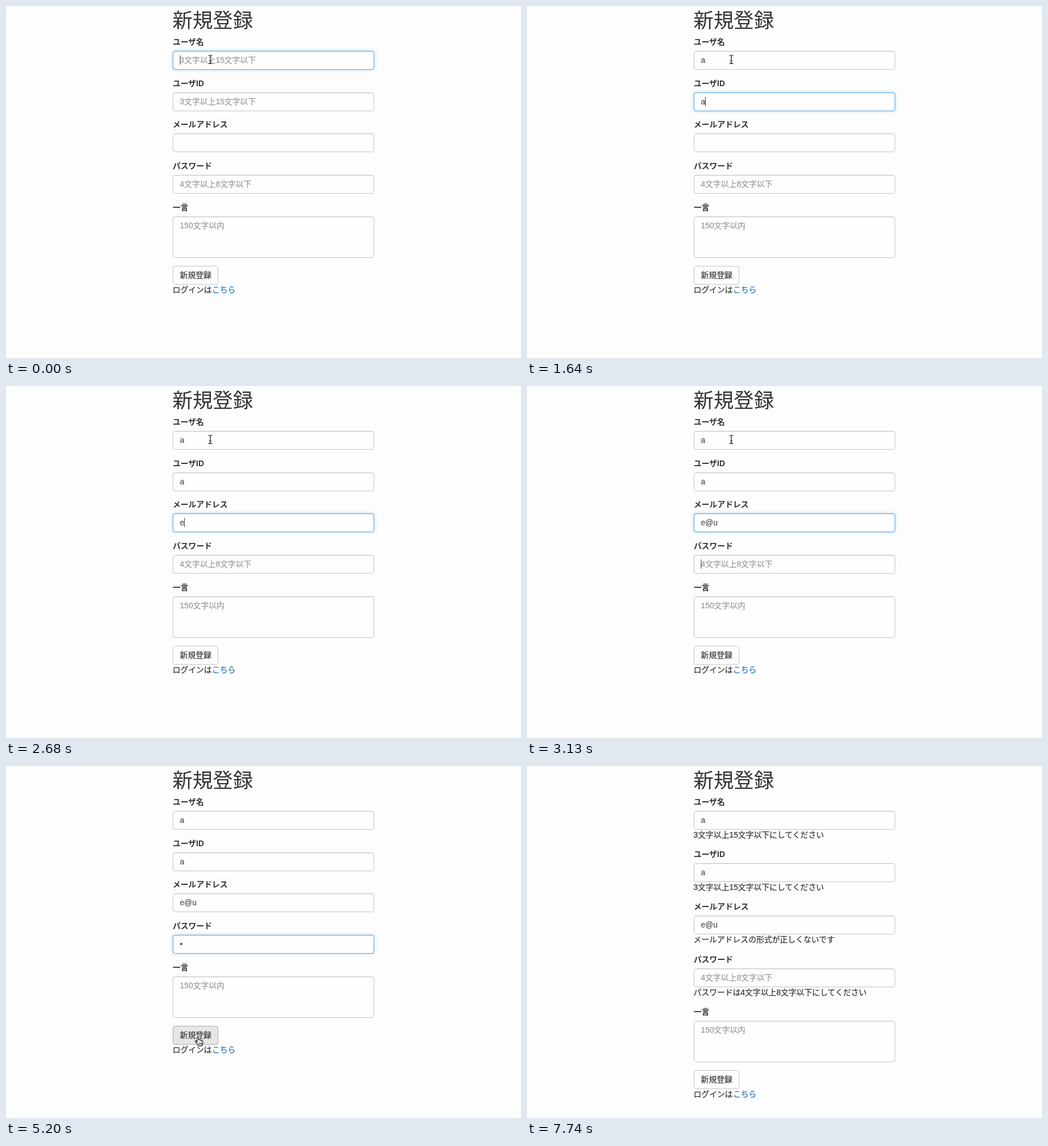
An HTML page that plays this animation: 905x619 px, repeating every 8940 ms.

```html
<!DOCTYPE html>
<html lang="ja">
<head>
<meta charset="utf-8">
<title>新規登録</title>
<style>
  html, body { margin: 0; width: 100%; height: 100%; overflow: hidden; background: #fdfdfd; }
  svg { display: block; }
  text {
    font: 13.8px "Liberation Sans", "Noto Sans CJK JP", "Noto Sans CJK", sans-serif;
    color: #333; fill: currentColor; stroke: currentColor; stroke-width: .22;
  }
  .title { font-size: 35.4px; font-weight: 300; stroke: none; }
  .label { font-weight: 700; stroke: none; }
  .value { color: #505050; }
  .hint { color: #999; }
  .link { color: #2272b8; }
  .box { fill: #fefefe; stroke: #c4c4c4; }
  .inset { stroke: #000; stroke-opacity: .05; }
  .glow { fill: #66afe9; fill-opacity: .6; filter: blur(3px); }
  .ring { fill: none; stroke: #5fabe6; }
  .focus { fill: none; stroke: #5b9fe6; stroke-width: 3; stroke-opacity: .75; }
  .caret { fill: #333; }
  .halo { fill: #fff; stroke: #fff; stroke-width: 2.6; stroke-linejoin: round; }
</style>
</head>
<body>
<svg id="stage" width="905" height="619" viewBox="0 0 905 619"></svg>
<script>
const LOOP = 8940, LEFT = 293, PAD = 305.6;
const svg = document.getElementById('stage');

function add(parent, tag, attrs = {}, content = '') {
  const el = document.createElementNS('http://www.w3.org/2000/svg', tag);
  for (const key in attrs) el.setAttribute(key, attrs[key]);
  el.textContent = content;
  return parent.appendChild(el);
}
const text = (parent, cls, x, y, content) => add(parent, 'text', { class: cls, x, y }, content);
const box = (parent, cls, w, h) =>
  add(parent, 'rect', { class: cls, x: LEFT + .5, y: .5, width: w - 1, height: h - 1, rx: 3.5 });
const fade = (el, level) => el.setAttribute('opacity', +level);
const move = (el, x, y) => el.setAttribute('transform', `translate(${x} ${y})`);

text(svg, 'title', 292.6, 38, '新規登録');

// label, hint, error, height
const fields = [
  ['ユーザ名', '3文字以上15文字以下', '3文字以上15文字以下にしてください', 33],
  ['ユーザID', '3文字以上15文字以下', '3文字以上15文字以下にしてください', 33],
  ['メールアドレス', '', 'メールアドレスの形式が正しくないです', 33],
  ['パスワード', '4文字以上8文字以下', 'パスワードは4文字以上8文字以下にしてください', 33],
  ['一言', '150文字以内', '', 73]
].map(([label, hint, error, h]) => {
  const g = add(svg, 'g');
  const glow = box(g, 'glow', 354, h);
  box(g, 'box', 354, h);
  add(g, 'path', { class: 'inset', d: `M${LEFT + 3} 1.5h348` });
  text(g, 'label', LEFT, -11, label);
  return {
    g, glow,
    ring: box(g, 'ring', 354, h),
    hint: text(g, 'hint', PAD, 21.2, hint),
    value: text(g, 'value', PAD, 21.3, ''),
    error: text(g, '', LEFT - .4, 47.2, error)
  };
});

const foot = add(svg, 'g');
const button = box(foot, 'box', 80, 33);
const outline = add(foot, 'rect', { class: 'focus', x: 291.5, y: -1.5, width: 83, height: 36, rx: 5 });
text(foot, '', PAD, 21.4, '新規登録');
text(foot, '', LEFT - .3, 47.2, 'ログインは');
text(foot, 'link', LEFT + 69, 47.2, 'こちら');

const caret = add(svg, 'rect', { class: 'caret', width: 1, height: 16 });

const beamPath = 'M-3.5-7.5Q0-7.5 0-5.5V5.5Q0 7.5-3.5 7.5M3.5-7.5Q0-7.5 0-5.5M0 5.5Q0 7.5 3.5 7.5M-2 2.5H2';
const handPath = 'M4 10V2Q4 .7 5.2.7T6.4 2V6.5Q6.6 5.6 7.7 5.7T8.8 6.9Q9 6.2 10 6.3T11 7.4' +
  'Q11.3 6.9 12.1 7.1T13.2 8.5V11.5Q13 13 12 14V15.5H5.5V14.2Q4 12.5 2.8 10.8L1 8.6Q.6 7.4 1.7 7.2T4 9.2Z';
const arrowPath = 'M.5.5V14l3.1-3 2 4.8 2.2-.9-2-4.7h4.3Z';

function pointer(d, style, scale = 1) {
  const g = add(svg, 'g');
  const shape = add(g, 'g', { transform: `scale(${scale})` });
  add(shape, 'path', { class: 'halo', d });
  add(shape, 'path', { d, ...style });
  return g;
}
const pointers = {
  beam: pointer(beamPath, { fill: 'none', stroke: '#111', 'stroke-width': 1.2 }),
  hand: pointer(handPath + 'M7.2 10.5v3M9.2 10.5v3M11.2 10.5v3', { fill: '#fff', stroke: '#111', 'stroke-width': 1.1 }, 1.1),
  arrow: pointer(arrowPath, { fill: '#111' })
};
pointers.beam.querySelector('.halo').style.fill = 'none';

// Each step changes only the listed parts. caret: [field, x]; at: [pointer, x, y]
const steps = [
  [0, { focus: [1, 0, 0, 0], values: ['', '', '', ''], caret: [0, 305.5], at: ['beam', 359, 94], button: 'idle', errors: 0 }],
  [150, { values: ['a', '', '', ''], caret: [0, 313] }],
  [750, { caret: null }],
  [900, { focus: [.8, .3, 0, 0], caret: [1, 305.5] }],
  [1050, { focus: [0, 1, 0, 0] }],
  [1500, { values: ['a', 'a', '', ''], caret: [1, 313] }],
  [1940, { focus: [0, .8, .3, 0], caret: [2, 305.5] }],
  [2090, { focus: [0, 0, 1, 0] }],
  [2680, { values: ['a', 'a', 'e', ''], caret: [2, 313] }],
  [2830, { values: ['a', 'a', 'e@u', ''], caret: [2, 335] }],
  [3130, { focus: [0, 0, 1, .05], caret: [3, 305.5] }],
  [3280, { focus: [0, 0, 0, 1] }],
  [3720, { values: ['a', 'a', 'e@u', '•'], caret: [3, 311] }],
  [4170, { caret: null }],
  [4320, { at: ['arrow', 357, 119] }],
  [4460, { at: ['beam', 351, 240] }],
  [4610, { at: ['beam', 343, 400] }],
  [4750, { at: ['hand', 331.5, 467], button: 'hover', caret: [3, 311] }],
  [4900, { at: ['hand', 331.5, 475] }],
  [5200, { caret: null }],
  [5640, { button: 'down' }],
  [5940, { button: 'idle', focus: [0, 0, 0, 0], values: ['a', 'a', 'e@u', ''], errors: 1 }],
  [7140, { at: ['arrow', 590, 545] }],
  [7290, { at: ['arrow', 757, 590] }],
  [7590, { at: ['arrow', 777, 600] }],
  [7740, { at: null }]
];
const buttonLook = { idle: ['#fefefe', '#c4c4c4'], hover: ['#e6e6e6', '#adadad'], down: ['#d4d4d4', '#8c8c8c'] };

function draw(s) {
  const pitch = s.errors ? 92.2 : 72.7;
  const top = i => Math.round(79 + i * pitch);
  fields.forEach((f, i) => {
    const value = s.values[i] || '', level = s.focus[i] || 0;
    move(f.g, 0, top(i));
    fade(f.glow, level);
    fade(f.ring, level);
    f.value.textContent = value;
    fade(f.hint, !value);
    fade(f.error, s.errors);
  });
  move(foot, 0, top(4) + 87);
  const [fill, stroke] = buttonLook[s.button];
  button.style.fill = fill;
  button.style.stroke = stroke;
  fade(outline, s.button === 'down');
  fade(caret, !!s.caret);
  if (s.caret) move(caret, s.caret[1], top(s.caret[0]) + 8);
  for (const name in pointers) {
    const on = !!s.at && s.at[0] === name;
    fade(pointers[name], on);
    if (on) move(pointers[name], s.at[1], s.at[2]);
  }
}

let shown = -1;
const start = performance.now();
function tick() {
  const t = (performance.now() - start) % LOOP;
  const past = steps.filter(([at]) => at <= t);
  if (past.length !== shown) {
    shown = past.length;
    draw(Object.assign({}, ...past.map(([, change]) => change)));
  }
  requestAnimationFrame(tick);
}
tick();
</script>
</body>
</html>
```
